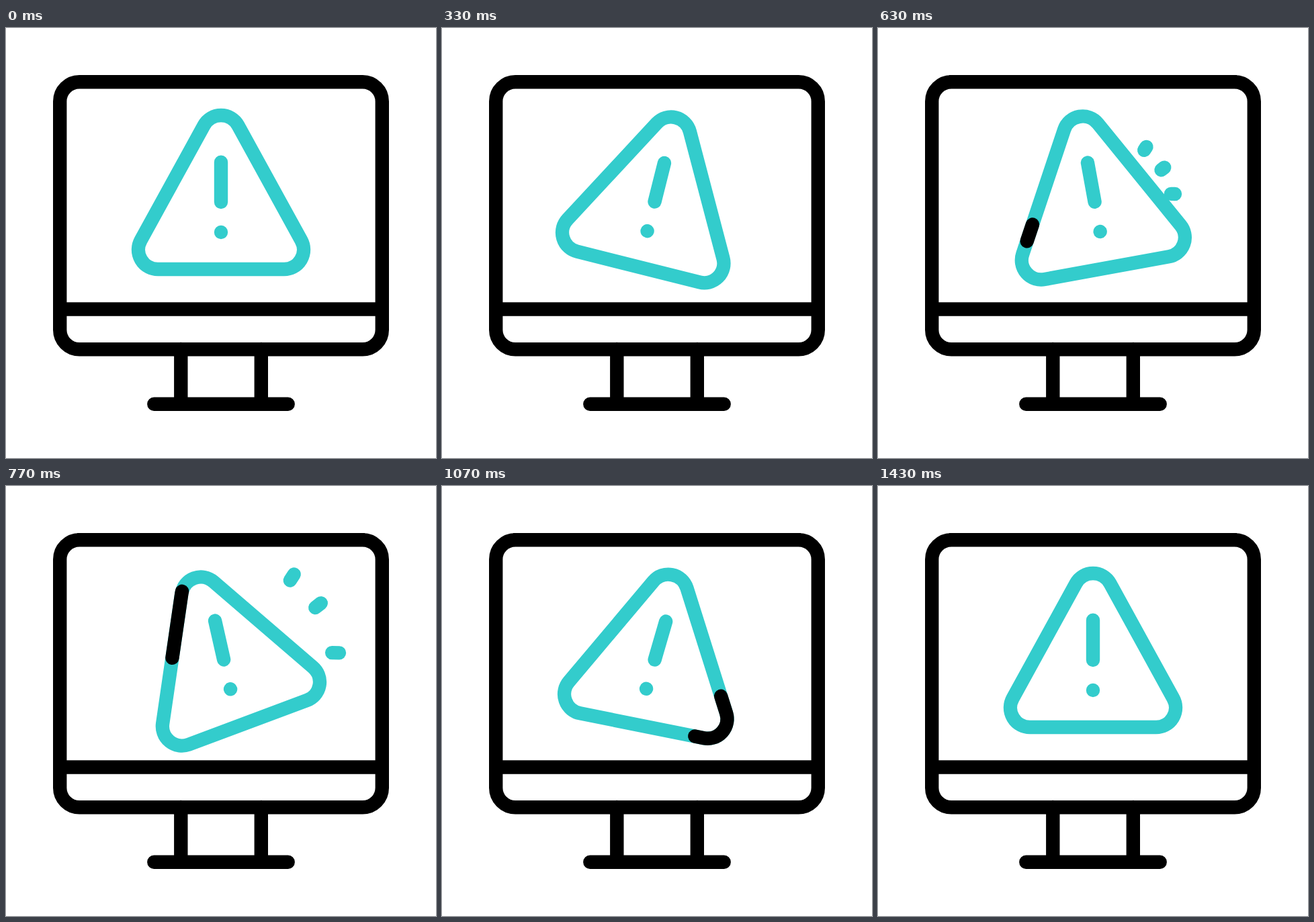
Animation of 640 by 640 pixels, one loop 1670 ms. Source, as an HTML page:

```html
<!DOCTYPE html>
<html lang="en">
<head>
<meta charset="utf-8">
<title>Screen alert</title>
<style>
  html, body { margin: 0; width: 100%; height: 100%; overflow: hidden; background: #fff; }
  svg { display: block; width: 100vw; height: 100vh; }
  svg * { fill: none; stroke-width: 20.4; stroke-linecap: round; }
  .ink { stroke: #000; }
  .teal { stroke: #33cccc; }
</style>
</head>
<body>
<svg viewBox="0 0 640 640">
  <defs>
    <path id="triangle" d="M200.6 316L294.6 145A29 29 0 0 1 345.4 145L439.4 316A29 29 0 0 1 414 359H226A29 29 0 0 1 200.6 316Z"/>
  </defs>
  <g class="ink">
    <rect x="80.2" y="80.2" width="479.6" height="398" rx="29"/>
    <path d="M80.2 418.5H559.8M260.3 478V559.7M379.8 478V559.7M220.3 559.7H419.7"/>
  </g>
  <g id="left" class="teal"></g>
  <g id="right" class="teal" transform="translate(640 -4) scale(-1 1)"></g>
  <g id="sign">
    <use href="#triangle" class="teal"/>
    <use href="#triangle" class="ink" id="spark"/>
    <path id="bang" class="teal" d="M320 199.7V259M320 304h.01"/>
  </g>
</svg>
<script>
const LOOP = 1670, FPS = 30;
const $ = id => document.getElementById(id);
const clamp = (v, lo, hi) => Math.min(hi, Math.max(lo, v));

// Turning points of the swing: time in ms, angle in degrees
const SWING = [[170, 0], [470, 25.5], [717, -24], [997, 16.8], [1235, -8.8], [1430, 0]];

function swing(t) {
  const i = SWING.findIndex(([time]) => t < time);
  if (i < 1) return 0;
  const [t0, a] = SWING[i - 1], [t1, b] = SWING[i];
  return a + (b - a) * (1 - Math.cos(Math.PI * (t - t0) / (t1 - t0))) / 2;
}

// The mark overshoots the sign once and settles back
function overshoot(t) {
  const u = clamp((t - 717) / 523, 0, 1);
  return 9.2 * Math.sin(Math.PI * Math.sqrt(u));
}

// A dash whose tail follows its head along a path
function runner(el, { start, speed, lag, reach, from = 0 }) {
  const run = ms => clamp((ms - start) * speed, 0, reach);
  return t => {
    const tail = run(t - lag), len = run(t) - tail;
    el.style.display = len > .1 ? '' : 'none';
    el.setAttribute('stroke-dasharray', `${len} 2000`);
    el.setAttribute('stroke-dashoffset', -from - tail);
  };
}

function ray(side, start, x, y, angle) {
  const el = document.createElementNS('http://www.w3.org/2000/svg', 'path');
  const reach = 60, a = angle * Math.PI / 180;
  el.setAttribute('d', `M${x} ${y}l${-reach * Math.cos(a)} ${-reach * Math.sin(a)}`);
  $(side).append(el);
  return runner(el, { start, speed: .6, lag: 68, reach });
}

const runners = [runner($('spark'), { start: 606, speed: 1.09, lag: 92, reach: 615, from: 20 })];
for (const [side, start] of [['right', 620], ['left', 790]]) {
  runners.push(
    ray(side, start, 243.8, 185.9, 57.2),
    ray(side, start, 218.5, 215.3, 38),
    ray(side, start, 204, 250.9, -1.4)
  );
}

function draw(t) {
  $('sign').setAttribute('transform', `rotate(${swing(t)} 320.2 244.6)`);
  $('bang').setAttribute('transform', `rotate(${overshoot(t)} 320 252)`);
  runners.forEach(run => run(t));
}

function tick() {
  const t = performance.now() % LOOP;
  const step = Math.floor((t + 3.4) * FPS / 1000);
  draw(Math.round(step * 100 / FPS) * 10);
  requestAnimationFrame(tick);
}
tick();
</script>
</body>
</html>
```
